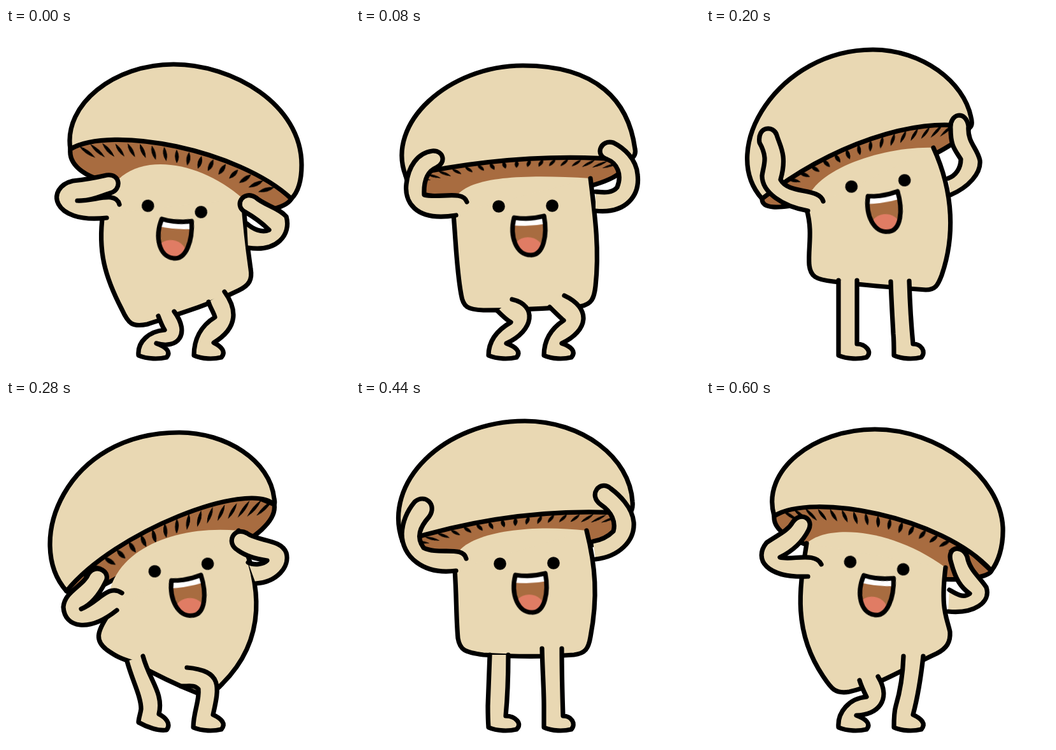
Recreate the animation shown at these times as an HTML page without scripts. Size 540x540 px, loop 640 ms.

```html
<!DOCTYPE html>
<html lang="en">
<head>
<meta charset="utf-8">
<title>Dancing mushroom</title>
<style>
html, body { margin: 0; height: 100%; overflow: hidden; background: #fff; }
svg { display: block; width: 100vw; height: 100vh; }
.ink { fill: #e9d8b3; stroke: #000; stroke-width: 7.2; stroke-linecap: round; stroke-linejoin: round; }
.brown { fill: #a86c40; }
.move { animation: .64s steps(2) infinite; }

#lift { animation-name: lift; animation-timing-function: steps(1); }
@keyframes lift {
  0%, 12.5%, 18.75%, 31.25%, 56.25%, 93.75%, to { transform: none; }
  6.25% { transform: translateY(3px); }
  25% { transform: translateY(-5px); }
  50% { transform: translateY(2px); }
  75% { transform: translateY(-6px); }
  81.25% { transform: translateY(-8px); }
  87.5% { transform: translateY(-4px); }
}

/* --up is the stretched pose, reached twice per loop */
#under { animation-name: under; --up: path("M73 222C85 242 120 240 170 240C280 260 430 230 428 178L265 100Z"); }
@keyframes under {
  0%, to { d: path("M101 190C98 215 125 240 185 245C280 300 430 300 448 268L265 100Z"); }
  12.5% { d: path("M78 232C85 265 120 268 180 262C280 270 430 250 425 207L265 100Z"); animation-timing-function: steps(1); }
  18.75% { d: var(--up); }
  31.25% { d: path("M88 268C88 284 110 284 160 275C250 250 400 190 414 156L265 100Z"); }
  43.75% { d: path("M95 300C110 312 140 300 190 270C280 280 430 215 421 164L265 100Z"); }
  56.25% { d: path("M82 288C95 315 140 305 175 290C280 290 440 235 425 190L265 100Z"); }
  68.75% { d: var(--up); animation-timing-function: steps(4); }
  93.75% { d: path("M107 182C105 205 135 222 175 232C280 290 440 290 448 268L265 100Z"); animation-timing-function: steps(1); }
}

#gills { animation-name: gills; --up: matrix(1,-.12,0,.55,250,183); }
@keyframes gills {
  0%, to { transform: matrix(.95,.2,0,.9,268,188); }
  12.5% { transform: matrix(1,-.07,0,.5,252,206); animation-timing-function: steps(1); }
  18.75% { transform: var(--up); }
  31.25% { transform: matrix(.92,-.3,0,.75,258,174); }
  43.75% { transform: matrix(.93,-.36,0,1,268,183); }
  56.25% { transform: matrix(.95,-.2,0,1.15,275,171); }
  68.75% { transform: var(--up); animation-timing-function: steps(4); }
  93.75% { transform: matrix(.93,.2,0,.8,270,179); animation-timing-function: steps(1); }
}

#cap { animation-name: cap; --up: path("M73 222C40 130 138 33 265 33C355 33 430 90 434 160C435 170 432 177 428 178C309 170 191 185 73 222Z"); }
@keyframes cap {
  0%, to { d: path("M101 190C90 120 170 57 263 57C356 57 464 120 464 215C464 240 458 258 448 268C365 191 165 152 101 190Z"); }
  12.5% { d: path("M78 232C46 150 145 59 262 59C379 59 428 115 438 190C440 200 434 206 425 207C314 198 198 206 78 232Z"); animation-timing-function: steps(1); }
  18.75% { d: var(--up); }
  31.25% { d: path("M88 268C18 190 114 34 262 34C340 34 405 85 416 140C418 148 418 154 414 156C330 138 195 184 88 268Z"); }
  43.75% { d: path("M95 300C28 225 92 51 272 51C345 51 415 95 421 155C422 159 422 162 421 164C380 125 170 207 95 300Z"); }
  56.25% { d: path("M82 288C28 205 106 57 265 57C345 57 412 110 424 175C425 180 426 186 425 190C390 126 170 176 82 288Z"); }
  68.75% { d: var(--up); animation-timing-function: steps(4); }
  93.75% { d: path("M107 182C86 110 170 46 265 46C365 46 462 120 466 200C467 232 458 255 448 268C370 182 165 145 107 182Z"); animation-timing-function: steps(1); }
}

#brow { fill: #e9d8b3; animation-name: brow; --up: path("M155 266C140 215 250 192 362 205L265 380Z"); }
@keyframes brow {
  0%, to { d: path("M152 290C165 190 290 195 372 268L265 380Z"); }
  12.5% { d: path("M153 292C140 235 240 228 368 236L265 380Z"); animation-timing-function: steps(1); }
  18.75% { d: var(--up); }
  31.25% { d: path("M158 285C150 230 270 185 357 188L265 380Z"); }
  43.75% { d: path("M160 338C150 240 260 195 365 205L265 380Z"); }
  56.25% { d: path("M156 322C148 240 250 200 360 220L265 380Z"); }
  68.75% { d: var(--up); animation-timing-function: steps(4); }
  93.75% { d: path("M158 225C190 195 290 200 376 263L265 380Z"); animation-timing-function: steps(1); }
}

#body { animation-name: body; --up: path("M155 266C158 310 157 340 160 374C163 392 170 396 200 400C250 403 300 403 342 400C360 398 365 390 368 372C380 310 376 260 362 205"); }
@keyframes body {
  0%, to { d: path("M152 292C144 350 155 390 182 442C192 464 198 470 222 465C280 446 320 434 365 412C382 404 387 395 384 378C380 350 377 330 372 268"); }
  12.5% { d: path("M153 292C157 340 158 380 165 418C168 438 175 442 200 443C260 443 300 440 352 437C370 434 374 424 376 405C382 350 376 300 368 236"); animation-timing-function: steps(1); }
  18.75% { d: var(--up); }
  31.25% { d: path("M158 285C168 320 160 345 162 372C164 390 172 395 200 398C250 404 300 408 345 411C360 411 364 404 370 388C390 330 390 260 357 188"); }
  43.75% { d: path("M160 338C142 365 140 378 158 392C172 402 180 406 200 412C240 434 270 448 300 460C318 466 328 458 340 445C410 375 402 290 365 205"); }
  56.25% { d: path("M156 322C152 360 148 385 150 412C152 430 162 437 190 440C240 446 290 446 330 444C346 442 350 436 358 418C388 350 390 285 360 220"); }
  68.75% { d: var(--up); animation-timing-function: steps(4); }
  93.75% { d: path("M158 225C148 290 134 360 184 434C196 452 202 462 225 458C275 446 310 422 362 398C378 390 384 380 383 364C378 340 368 330 376 263"); animation-timing-function: steps(1); }
}

#face { animation-name: face; --up: translate(268px,256.5px) rotate(-.7deg); }
@keyframes face {
  0%, to { transform: translate(264.5px,284px) rotate(6.7deg); }
  12.5% { transform: translate(266px,279.5px) rotate(-.7deg); animation-timing-function: steps(1); }
  18.75% { transform: var(--up); }
  31.25% { transform: translate(270px,244px) rotate(-6.8deg); }
  43.75% { transform: translate(275px,263px) rotate(-8.1deg); }
  56.25% { transform: translate(278px,282.5px) rotate(-3.4deg); }
  68.75% { transform: var(--up); animation-timing-function: steps(4); }
  93.75% { transform: translate(268px,260px) rotate(8deg); animation-timing-function: steps(1); }
}

#armL { animation-name: armL; --up: path("M157 268C105 275 72 245 72 210C73 190 82 172 92 160C108 146 128 164 115 183C100 200 94 215 106 232C130 244 168 228 173 249"); }
@keyframes armL {
  0%, to { d: path("M158 298C70 308 62 250 105 240C125 238 145 234 158 231C180 228 182 254 164 259C148 264 132 272 112 271C140 272 172 255 178 277"); }
  12.5% { d: path("M157 294C90 305 76 270 79 245C82 218 96 196 120 193C138 192 142 212 126 219C112 225 106 240 107 262C130 268 168 254 174 273"); animation-timing-function: steps(1); }
  18.75% { d: var(--up); }
  31.25% { d: path("M160 287C120 280 88 258 88 232C90 215 98 205 84 180C80 154 106 152 111 168C116 185 128 200 117 238C130 262 178 250 184 272"); }
  43.75% { d: path("M174 330C130 365 92 358 90 325C92 300 122 292 130 272C142 256 166 270 156 286C148 302 136 320 118 328C145 318 160 288 182 303"); }
  56.25% { d: path("M170 318C125 345 86 335 84 292C86 262 115 258 140 244C158 238 162 262 147 270C130 278 112 288 122 303C145 302 160 278 182 291"); }
  68.75% { d: var(--up); animation-timing-function: steps(4); }
  93.75% { d: path("M160 277C95 280 74 250 95 224C112 212 128 206 136 192C148 174 170 186 161 204C152 222 138 236 116 247C135 252 172 238 181 258"); animation-timing-function: steps(1); }
}

#armR { animation-name: armR; --up: path("M376 250C412 246 438 222 436 192C434 168 412 148 400 139C382 124 364 150 384 164C402 176 408 192 404 206C394 216 384 220 372 222"); }
@keyframes armR {
  0%, to { d: path("M380 345C425 352 448 325 440 296C428 282 405 278 392 266C372 254 358 278 374 288C388 296 402 306 413 317C402 322 388 316 378 307"); }
  12.5% { d: path("M376 287C425 292 446 262 442 230C440 205 420 188 404 180C384 174 374 200 394 206C410 212 418 230 410 250C402 260 388 258 376 257"); animation-timing-function: steps(1); }
  18.75% { d: var(--up); }
  31.25% { d: path("M384 262C412 250 432 228 430 208C426 188 410 180 412 154C408 128 382 134 384 158C384 185 390 190 400 206C400 220 392 232 380 236"); }
  43.75% { d: path("M392 288C425 286 446 262 440 240C432 218 395 222 378 209C358 198 344 224 364 236C378 246 395 250 410 252C404 258 390 260 380 255"); }
  56.25% { d: path("M382 283C425 288 448 258 440 236C430 208 400 204 376 207C352 210 352 234 374 232C390 230 410 230 411 243C408 254 390 252 378 252"); }
  68.75% { d: var(--up); animation-timing-function: steps(4); }
  93.75% { d: path("M380 332C420 336 448 318 440 294C430 278 414 268 410 246C402 226 376 230 385 256C392 282 400 294 414 304C404 312 392 304 382 298"); animation-timing-function: steps(1); }
}

#legL { animation-name: legL; }
@keyframes legL {
  0%, to { d: path("M239 452C242 460 245 468 249 474C225 476 206 492 208 514C222 520 240 520 252 517C260 508 250 500 236 495C270 505 290 480 264 445"); }
  12.5% { d: path("M222 444C228 450 236 458 243 462C222 474 208 490 208 514C222 520 240 520 252 517C260 508 250 500 236 495C280 475 285 435 245 426"); animation-timing-function: steps(1); }
  18.75%, 68.75%, 81.25% { d: path("M210 400C209 430 208 455 207 480C207 490 207 500 208 514C222 520 240 520 252 517C262 508 250 496 235 496C238 465 239 430 239 400"); }
  31.25% { d: path("M208 396C208 430 208 460 208 480C208 490 208 500 208 514C222 520 240 520 252 517C262 508 250 496 237 496C237 465 237 430 237 396"); }
  43.75% { d: path("M190 410C198 440 212 465 212 485C211 493 208 500 208 506C222 514 240 520 252 518C260 508 250 498 240 493C248 460 225 440 215 402"); }
  56.25% { d: path("M208 444C215 450 226 456 236 459C218 474 208 490 208 514C222 520 240 520 252 517C260 508 250 500 236 495C270 480 285 440 225 420"); }
  93.75% { d: path("M241 440C244 450 248 458 252 466C225 468 206 490 208 514C222 520 240 520 252 517C260 508 250 500 236 495C270 495 292 470 270 434"); animation-timing-function: steps(1); }
}

#legR { animation-name: legR; }
@keyframes legR {
  0%, to { d: path("M318 430C320 438 326 446 328 454C305 468 295 490 295 514C308 520 326 520 338 517C346 508 338 500 326 494C366 470 362 440 343 414"); }
  12.5% { d: path("M304 438C312 446 320 454 326 459C306 472 295 490 295 514C308 520 326 520 338 517C346 508 338 500 323 495C365 475 370 440 327 420"); animation-timing-function: steps(1); }
  18.75%, 68.75%, 81.25% { d: path("M292 390C293 430 295 455 295 480C295 490 295 500 295 514C308 520 326 520 338 517C346 508 338 496 325 496C324 465 323 430 323 390"); }
  31.25% { d: path("M290 398C291 430 293 460 294 480C295 490 295 500 295 514C308 520 326 520 338 517C346 508 338 496 325 496C322 465 320 430 319 397"); }
  43.75% { d: path("M274 449C284 450 296 446 302 454C304 472 294 490 294 514C308 520 326 520 338 517C346 508 338 500 325 494C335 450 340 425 284 420"); }
  56.25% { d: path("M289 443C300 448 312 454 320 458C300 474 295 490 295 514C308 520 326 520 338 517C346 508 338 500 323 495C355 478 368 440 307 419"); }
  93.75% { d: path("M310 402C309 430 304 460 298 480C295 490 295 500 295 514C308 520 326 520 338 517C346 508 338 500 325 494C334 460 338 430 341 402"); animation-timing-function: steps(1); }
}
</style>
</head>
<body>
<svg viewBox="0 0 540 540">
  <defs>
    <path id="gill" d="M0-11Q6 0 0 11Q-5 0 0-11Z" stroke="#000"/>
    <g id="half">
      <use href="#gill" transform="translate(19 15) rotate(8)"/>
      <use href="#gill" transform="translate(38 17) rotate(15)"/>
      <use href="#gill" transform="translate(56 18) rotate(23)"/>
      <use href="#gill" transform="translate(75 21) rotate(30)"/>
      <use href="#gill" transform="translate(94 25) rotate(38)"/>
      <use href="#gill" transform="translate(113 29) rotate(46) scale(1 1.15)"/>
      <use href="#gill" transform="translate(131 34) rotate(54) scale(1 1.25)"/>
      <use href="#gill" transform="translate(148 40) rotate(62) scale(1 1.25)"/>
    </g>
    <path id="mouth" d="M-18 18Q5 22 29 16C34 45 28 78 7 77C-15 77-26 48-18 18Z"/>
    <clipPath id="lips"><use href="#mouth"/></clipPath>
  </defs>

  <g id="lift" class="move">
    <path id="under" class="ink brown move"/>
    <g id="gills" class="move">
      <use href="#gill" y="15"/>
      <use href="#half"/>
      <use href="#half" transform="scale(-1 1)"/>
    </g>
    <path id="cap" class="ink move"/>
    <path id="brow" class="move"/>
    <path id="body" class="ink move"/>
    <g id="face" class="move">
      <circle cx="-42" r="9.8"/>
      <circle cx="42" r="9.8"/>
      <g clip-path="url(#lips)">
        <use href="#mouth" class="brown"/>
        <ellipse cx="3" cy="73" rx="25" ry="24" fill="#e07c64"/>
        <path d="M-24 18Q5 22 34 16" fill="none" stroke="#fff" stroke-width="23"/>
      </g>
      <use href="#mouth" class="ink" style="fill:none"/>
    </g>
    <path id="armL" class="ink move"/>
    <path id="armR" class="ink move"/>
  </g>
  <path id="legL" class="ink move"/>
  <path id="legR" class="ink move"/>
</svg>
</body>
</html>
```
